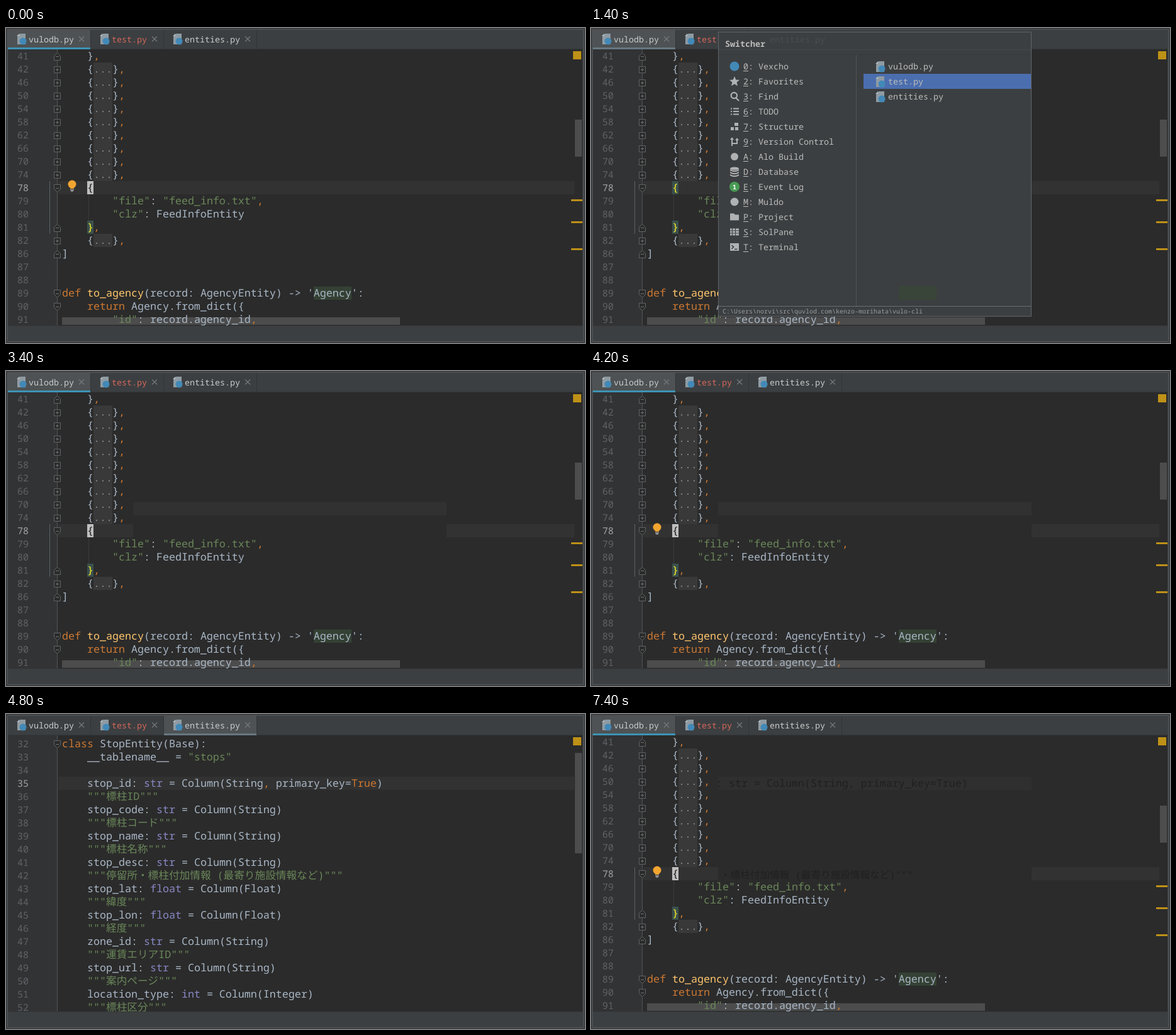
Animation of 920x502 px, one loop 7600 ms. Source, as an HTML page:

```html
<!DOCTYPE html>
<html lang="en">
<head>
<meta charset="utf-8">
<title>Editor tab switcher</title>
<style>
html, body { margin: 0; width: 100%; height: 100%; overflow: hidden; background: #3c3f41; }
svg { display: block; }
text { font-family: "Noto Sans Mono", "Noto Sans CJK JP", "DejaVu Sans Mono", monospace; white-space: pre; text-rendering: geometricPrecision; }
.code { font-size: 16.667px; }
.num { font-size: 15px; text-anchor: end; }
.ui { font-size: 13.333px; }
.path { font-size: 10px; }
</style>
</head>
<body>
<svg id="stage" width="920" height="502" viewBox="0 0 920 502"></svg>
<script>
const LOOP = 7600;
const GOLD = '#be9117', RED = '#d5665b', GREY = '#afb1b3', BLUE = '#4289b8';
const INK = { d: '#a9b7c6', k: '#cc7832', s: '#6a8759', f: '#ffc66d', b: '#8888c6', n: '#6897bb', g: '#85888a', y: '#ffef28' };
const FILES = ['vulodb.py', 'test.py', 'entities.py'];
const TABS = [[3, 131], [135, 115], [251, 147]];

const svg = document.getElementById('stage');

function el(parent, tag, attrs, content) {
  const node = document.createElementNS('http://www.w3.org/2000/svg', tag);
  for (const key in attrs) node.setAttribute(key, attrs[key]);
  if (content !== undefined) node.textContent = content;
  parent.appendChild(node);
  return node;
}
const group = (p, attrs) => el(p, 'g', attrs);
const rect = (p, x, y, width, height, fill) => el(p, 'rect', { x, y, width, height, fill });
const circle = (p, cx, cy, r, fill) => el(p, 'circle', { cx, cy, r, fill });
const shape = (p, d, fill) => el(p, 'path', { d, fill });
const line = (p, d, stroke, width = 1) => el(p, 'path', { d, stroke, fill: 'none', 'stroke-width': width });
const label = (p, cls, x, y, fill, s) => el(p, 'text', { class: cls, x, y, fill }, s);
const show = (node, on) => node.setAttribute('display', on ? 'inline' : 'none');

// Markup alternates ink keys and text: "k|def |f|main|d|():"
function code(p, x, top, markup) {
  const parts = markup.split('|');
  const text = el(p, 'text', { class: 'code', x, y: top + 16 });
  for (let i = 0; i < parts.length; i += 2) el(text, 'tspan', { fill: INK[parts[i]] }, parts[i + 1]);
}

function wave(p, x, y, width) {
  let d = `M${x} ${y + 1}`;
  for (let i = 2; i <= width; i += 2) d += `L${x + i} ${y + (i % 4 ? -1 : 1)}`;
  line(p, d, '#5c8a5a');
}

function fold(p, x, top, kind) {
  const y = top + 11;
  const box = {
    '+': `M${x - 4.5} ${y - 4.5}h10v10h-10z`,
    'v': `M${x - 4.5} ${y - 5.5}h10v7l-5 5l-5 -5z`,
    '^': `M${x - 4.5} ${y + 6.5}h10v-7l-5 -5l-5 5z`
  }[kind];
  line(p, box, '#606365').setAttribute('fill', '#2b2b2b');
  line(p, `M${x - 2} ${y + .5}h5` + (kind === '+' ? `M${x + .5} ${y - 2}v5` : ''), '#6d7072');
}

function fileIcon(p, x, y) {
  shape(p, `M${x + 6} ${y}h9v17h-13v-12z`, '#8f9ba3');
  shape(p, `M${x + 1} ${y + 4}l4 -4v4z`, '#b3bcc2');
  circle(p, x + 11, y + 12, 5.5, BLUE);
}

function newView(edge) {
  const g = group(svg, { 'clip-path': 'url(#pane)' });
  rect(g, 3, 34, edge - 2, 440, '#313335');
  return g;
}
const number = (p, x, top, n, on) => label(p, 'num', x, top + 16, on ? '#a4a3a3' : '#606366', n);
const stripe = (p, ys) => ys.forEach(y => rect(p, 898, y, 18, 3, GOLD));
const edgeLine = (p, x) => line(p, `M${x + .5} 34V474`, '#505355');

function caretBlock(p, x, top, glyph) {
  const g = group(p);
  rect(g, x, top, 10, 21, '#bfbfbf');
  if (glyph) label(g, 'code', x, top + 16, '#1c1c1c', glyph);
  return g;
}

// Frame and tabs
const pane = el(el(svg, 'defs'), 'clipPath', { id: 'pane' });
rect(pane, 3, 34, 913, 440, '#000');
rect(svg, 0, 0, 920, 502, '#3c3f41');
line(svg, 'M2.5 499.5V2.5H917.5V499.5Z', '#55595b');
rect(svg, 3, 34, 913, 440, '#2b2b2b');

// Main file
const main = newView(81);
rect(main, 83, 244, 119, 21, '#323232');
rect(main, 700, 244, 203, 21, '#323232');
const midRow = rect(main, 202, 244, 498, 21, '#323232');
const ghostRow = rect(main, 202, 209, 498, 21, '#313131');
const ghostText = group(main);
rect(ghostText, 202, 100, 498, 21, '#2f2f2f');
label(ghostText, 'code', 199, 116, '#202020', ': str = Column(String, primary_key=True)');
label(ghostText, 'code', 206, 262, '#202020', '・標柱付加情報 (最寄り施設情報など)"""').style.fontSize = '15.6px';
edgeLine(main, 81);
line(main, 'M69.5 244V328', '#5b6266');
line(main, 'M131.5 265V307', '#3b3b3b');

const mainRows = [
  [41, '^', 'd|    }|k|,'],
  ...[42, 46, 50, 54, 58, 62, 66, 70, 74].map(n => [n, '+']),
  [78, 'v', ''],
  [79, '', 's|        "file"|d|: |s|"feed_info.txt"|k|,'],
  [80, '', 's|        "clz"|d|: FeedInfoEntity'],
  [81, '^', 'y|    }|k|,'],
  [82, '+'],
  [86, '^', 'd|]'],
  [87], [88],
  [89, 'v', "k|def |f|to_agency|d|(record: AgencyEntity) -> 'Agency':"],
  [90, 'v', 'k|    return |d|Agency.from_dict({'],
  [91, '', 's|        "id"|d|: record.agency_id|k|,']
];
rect(main, 129, 307, 10, 21, '#3b514d');
rect(main, 489, 412, 60, 21, '#344134');
rect(main, 89, 461, 537, 12, '#4c4c4c');
mainRows.forEach(([n, kind, text], i) => {
  const top = 34 + 21 * i;
  number(main, 36, top, n, n === 78);
  if (kind) fold(main, 81, top, kind);
  if (kind === '+') {
    rect(main, 139, top, 30, 21, '#393939');
    text = 'd|    {|g|...|d|}|k|,';
  }
  if (text) code(main, 89, top, text);
});
rect(main, 129, 244, 10, 21, '#3b514d');
code(main, 129, 244, 'y|{');
const mainCaret = caretBlock(main, 129, 244, '{');
const bulb = group(main);
circle(bulb, 105, 249, 6.5, '#f2a530');
rect(bulb, 102, 254, 6, 2, '#f2a530');
rect(bulb, 102, 257, 6, 1.5, '#a9a9a9');
rect(bulb, 103, 259, 4, 1.5, '#a9a9a9');
rect(main, 904, 146, 11, 59, '#4d4d4d');
stripe(main, [273, 308, 351]);

// Test file
const test = newView(72);
rect(test, 139, 209, 30, 21, '#323232');
rect(test, 202, 209, 498, 21, '#323232');
rect(test, 82, 244, 120, 21, '#2e2e2e');
rect(test, 700, 244, 203, 21, '#323232');
rect(test, 160, 20, 30, 21, '#52503a');
edgeLine(test, 72);
const testRows = {
  8: 'd|    sys.out(|s|"hoge"|d|)',
  9: 'd|    hoge_hoge_hoge_hogebiro_n = |n|2',
  10: 'k|    pass',
  13: 'k|def |f|owl_sum|d|(a: |b|int|k|, |d|b: |b|str|k|, |d|c: |b|any|d|) -> |b|int|d|:',
  14: 'd|    Hoge()',
  15: 'k|    return |d|a + |b|int|d|(b) + c',
  18: 'k|def |f|main|d|():',
  19: 'd|    owl_sum(|n|1|k|, |s|"11"|k|, |s|"hoge"|d|)',
  22: "k|if |d|__name__ == |s|'__main__'|d|:",
  23: 'd|    main()'
};
const testFolds = { 10: '^', 13: 'v', 15: '^', 18: 'v', 19: '^' };
for (let n = 8; n <= 24; n++) {
  const top = 209 + 21 * (n - 17);
  number(test, 27, top, n, n === 17);
  if (testFolds[n]) fold(test, 72, top, testFolds[n]);
  if (testRows[n]) code(test, 80, top, testRows[n]);
}
wave(test, 210, 38, 40);
wave(test, 120, 60, 250);
wave(test, 300, 269, 40);
shape(test, 'M39 319L49 324.5L39 330Z', '#499c54');
const testCaret = caretBlock(test, 80, 209);
rect(test, 904, 167, 11, 300, '#474747');
stripe(test, [55, 156]);

// Entities file
const ents = newView(81);
rect(ents, 83, 100, 820, 21, '#323232');
edgeLine(ents, 81);
const fields = [
  ['stop_id', 'str', 'String', '標柱ID'],
  ['stop_code', 'str', 'String', '標柱コード'],
  ['stop_name', 'str', 'String', '標柱名称'],
  ['stop_desc', 'str', 'String', '停留所・標柱付加情報 (最寄り施設情報など)'],
  ['stop_lat', 'float', 'Float', '緯度'],
  ['stop_lon', 'float', 'Float', '経度'],
  ['zone_id', 'str', 'String', '運賃エリアID'],
  ['stop_url', 'str', 'String', '案内ページ'],
  ['location_type', 'int', 'Integer', '標柱区分']
];
for (let i = -1; i < 21; i++) number(ents, 36, 37 + 21 * i, 32 + i, i === 3);
code(ents, 89, 37, 'k|class |d|StopEntity(Base):');
code(ents, 89, 58, 'd|    __tablename__ = |s|"stops"');
fold(ents, 81, 37, 'v');
fields.forEach(([name, type, column, note], i) => {
  const top = 100 + 42 * i;
  const key = i ? '' : 'k|, |d|primary_key=|k|True|';
  code(ents, 129, top, `d|${name}: |b|${type}|d| = Column(${column}|${key}d|)`);
  code(ents, 129, top + 21, `s|"""${note}"""`);
});
const entsCaret = caretBlock(ents, 129, 100, 's');
rect(ents, 904, 62, 11, 160, '#4d4d4d');

rect(svg, 901, 37, 13, 13, GOLD);

const tabBar = group(svg);
rect(tabBar, 3, 3, 913, 31, '#3c3f41');
line(tabBar, 'M3 33.5H916', '#333638');
const tabFill = rect(tabBar, 0, 3, 0, 31, '#4e5254');
const tabMark = rect(tabBar, 0, 31, 0, 3, BLUE);
TABS.forEach(([x, width], i) => {
  const right = x + width;
  line(tabBar, `M${right + .5} 3V33`, '#323537');
  fileIcon(tabBar, x + 13, 9);
  label(tabBar, 'ui', x + 33, 23, i === 1 ? RED : '#c8cacb', FILES[i]);
  line(tabBar, `M${right - 18} 13.5l8 8m0 -8l-8 8`, '#75797b', 1.2);
});
line(svg, 'M3 474.5H916', '#343739');

// Switcher popup
const popup = group(svg);
rect(popup, 202, 6, 498, 454, '#3c3f41');
line(popup, 'M202.5 6.5H699.5V459.5H202.5Z', '#616567');
label(popup, 'ui', 284, 23, '#4a4d4f', FILES[2]);
label(popup, 'ui', 213, 30, '#bbbbbb', 'Switcher').style.fontWeight = 700;
line(popup, 'M203 34.5H699', '#46494b');
line(popup, 'M203 42.5H699', '#37393b');
line(popup, 'M421.5 43V443', '#515456');
line(popup, 'M203 443.5H699', '#6b6e70');
rect(popup, 489, 411, 60, 22, '#394538');

const icons = [
  (g) => circle(g, 0, 0, 7.5, BLUE),
  (g) => shape(g, 'M0 -8L2.3 -2.6L8 -2.2L3.6 1.6L5 7.2L0 4.2L-5 7.2L-3.6 1.6L-8 -2.2L-2.3 -2.6Z', GREY),
  (g) => line(g, 'M2.5 2.5L7 7M4 -1.5A4.7 4.7 0 1 1 -5.4 -1.5A4.7 4.7 0 1 1 4 -1.5', GREY, 2.2),
  (g) => line(g, 'M-6 -4.5h2m2 0h9M-6 0h2m2 0h9M-6 4.5h2m2 0h9', GREY, 2),
  (g) => shape(g, 'M0 -6h6v5h-6zM-6 1h5v5h-5zM1 1h5v5h-5z', GREY),
  (g) => {
    line(g, 'M-4 7V-5M-4 3H4V-3', GREY, 2);
    shape(g, 'M-7 -3L-4 -7L-1 -3ZM1 -2L4 -6L7 -2Z', GREY);
  },
  (g) => circle(g, 0, 0, 6, GREY),
  (g) => {
    el(g, 'ellipse', { cx: 0, cy: -5, rx: 7, ry: 2.6, fill: GREY });
    [-2.5, 1.5, 5.5].forEach(y => shape(g, `M-7 ${y - 1.5}Q0 ${y + 3} 7 ${y - 1.5}V${y + .8}Q0 ${y + 4.5} -7 ${y + .8}Z`, GREY));
  },
  (g) => {
    circle(g, 0, 0, 8, '#499c54');
    label(g, 'path', -3, 4, '#ffffff', '1').style.fontWeight = 700;
  },
  (g) => circle(g, 0, 0, 6.5, GREY),
  (g) => shape(g, 'M-7 -5.5H-1L1 -3.5H7V5.5H-7Z', GREY),
  (g) => [-5.5, -1.5, 2.5].forEach(y => shape(g, `M-7 ${y}h3v3h-3zM-3 ${y}h4v3h-4zM2 ${y}h5v3h-5z`, GREY)),
  (g) => {
    rect(g, -7, -6, 14, 12, GREY);
    line(g, 'M-4.5 -3L-1.5 0L-4.5 3M0 3.5H4.5', '#3c3f41', 1.6);
  }
];
const tools = ['0Vexcho', '2Favorites', '3Find', '6TODO', '7Structure', '9Version Control', 'AAlo Build',
  'DDatabase', 'EEvent Log', 'MMuldo', 'PProject', 'SSolPane', 'TTerminal'];
tools.forEach((tool, i) => {
  const y = 61 + 24 * i;
  icons[i](group(popup, { transform: `translate(228 ${y})` }));
  label(popup, 'ui', 242, y + 5, '#bbbbbb', `${tool[0]}: ${tool.slice(1)}`);
  line(popup, `M242 ${y + 7.5}h8`, '#bbbbbb');
});
const selection = rect(popup, 433, 73, 266, 24, '#4b6eaf');
const entries = FILES.map((name, i) => {
  fileIcon(popup, 451, 53 + 24 * i);
  return label(popup, 'ui', 472, 66 + 24 * i, '#bbbbbb', name);
});
const folder = 'C:\\Users\\norvi\\src\\quvlod.com\\kenzo-morihata\\vulo-cli';
const pathText = label(popup, 'path', 209, 455, '#9a9c9e', '');

// view: open file, pick: popup row, old: leftovers behind the main file
const steps = [
  { at: 0, view: 0, caret: 1, bulb: 1 },
  { at: 800, view: 0, bulb: 1 },
  { at: 1200, view: 0, caret: 1, bulb: 1 },
  { at: 1400, view: 0, pick: 1 },
  { at: 2400, view: 1, caret: 1 },
  { at: 2800, view: 1 },
  { at: 3400, view: 0, caret: 1, old: 1 },
  { at: 4200, view: 0, caret: 1, bulb: 1, old: 1 },
  { at: 4400, view: 0, pick: 1, old: 1 },
  { at: 4600, view: 0, pick: 2, old: 1 },
  { at: 4800, view: 2, dim: 1 },
  { at: 5000, view: 2, caret: 1 },
  { at: 5400, view: 2 },
  { at: 5800, view: 0, caret: 1, old: 2 },
  { at: 6600, view: 0, caret: 1, bulb: 1, old: 2 },
  { at: 6800, view: 0, bulb: 1, old: 2 },
  { at: 7400, view: 0, caret: 1, bulb: 1, old: 2 }
];
const views = [main, test, ents];
const carets = [mainCaret, testCaret, entsCaret];

function draw(t) {
  const s = steps.filter(step => step.at <= t).pop();
  views.forEach((v, i) => show(v, i === s.view));
  carets.forEach(c => show(c, s.caret));
  show(bulb, s.bulb);
  show(midRow, !s.old);
  show(ghostRow, s.old === 1);
  show(ghostText, s.old === 2);

  const [x, width] = TABS[s.view];
  for (const r of [tabFill, tabMark]) {
    r.setAttribute('x', x);
    r.setAttribute('width', width);
  }
  tabMark.setAttribute('fill', s.pick || s.dim ? '#667882' : '#3d94b5');

  show(popup, s.pick);
  if (!s.pick) return;
  selection.setAttribute('y', 49 + 24 * s.pick);
  entries[1].setAttribute('fill', s.pick === 1 ? '#bbbbbb' : RED);
  pathText.textContent = folder + (s.pick === 2 ? '\\vulocli\\dao' : '');
}

const start = performance.now();
function tick() {
  draw((performance.now() - start) % LOOP);
  requestAnimationFrame(tick);
}
tick();
</script>
</body>
</html>
```
